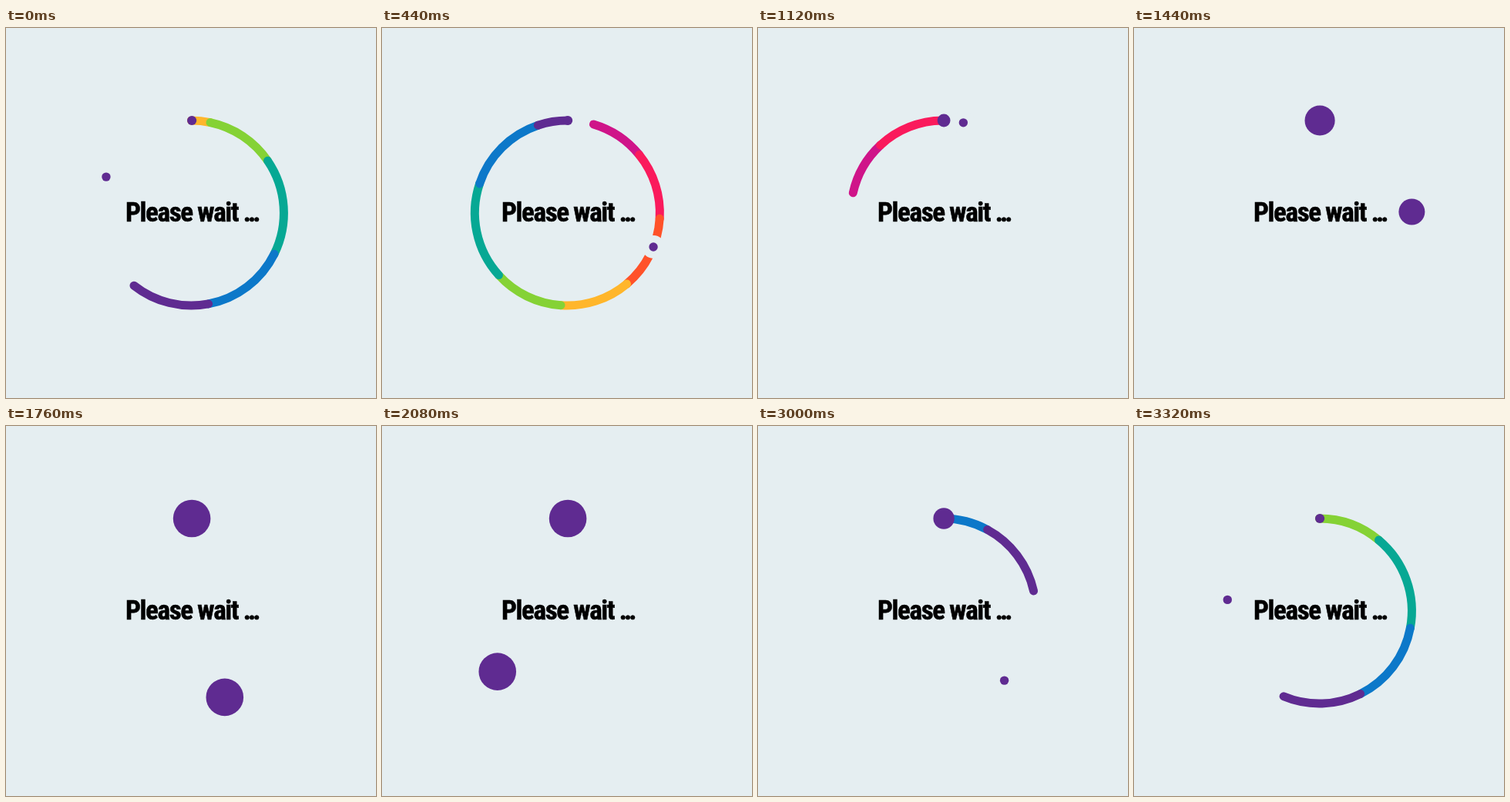
An HTML page with a canvas for the animation above (3360 ms loop, 480x480 px).

```html
<!DOCTYPE html>
<html lang="en">
<head>
<meta charset="utf-8">
<title>Please wait</title>
<style>
  html, body { margin: 0; width: 100%; height: 100%; overflow: hidden; background: #e5eef1; }
  canvas, svg { position: absolute; left: 0; top: 0; width: 480px; height: 480px; }
  text {
    font-family: Impact, "Roboto Condensed", "Open Sans Condensed", "Liberation Sans Narrow", "Liberation Sans", sans-serif;
    font-weight: 900;
    letter-spacing: -0.04em;
    fill: #000;
    stroke: #000;
    stroke-width: 0.5px;
  }
  .dots { letter-spacing: -0.115em; }
</style>
</head>
<body>
<canvas id="ring" width="480" height="480"></canvas>
<svg viewBox="0 0 480 480"><text id="label" x="155" y="250.5" font-size="100">Please wait <tspan class="dots">...</tspan></text></svg>
<script>
const BG = '#e5eef1', PURPLE = '#5f2b91';
const CX = 240.4, CY = 240, R = 120, WIDTH = 11;
const TOP_X = 241.1;
const STEP = 40, STEPS = 84, OFFSET = 14;
const SPEED = 360 / 23;

// Colour bands from the head back, each with its end in degrees behind the head
const BANDS = [
  [PURPLE, 49], ['#0c78c9', 102], ['#06a894', 162.7], ['#85d235', 206.5],
  ['#ffb62b', 250.5], ['#ff5229', 297], ['#fa1a5c', 339.5], ['#cf1489', 374]
];

// Orbiting dot: [step, total degrees]
const ORBIT = [
  [0, 0], [1, 24], [2, 56], [3, 89], [4, 116], [5, 138.7], [8, 193], [13, 277], [14, 293],
  [25, 471.5], [42, 732.5], [56, 860.7], [58, 878.8], [70, 983], [74, 1015], [84, 1080]
];

const ctx = document.getElementById('ring').getContext('2d');
const rad = deg => (deg - 90) * Math.PI / 180;

function ease(n, from, to) {
  const p = Math.min(1, Math.max(0, (n - from) / (to - from)));
  return p * p * (3 - 2 * p);
}

const slope = i => (ORBIT[i + 1][1] - ORBIT[i][1]) / (ORBIT[i + 1][0] - ORBIT[i][0]);

function tangent(i) {
  if (i === 0) return slope(0);
  if (i === ORBIT.length - 1) return 4;
  const a = slope(i - 1), b = slope(i);
  return 2 * a * b / (a + b);
}

function orbitAngle(n) {
  let i = 0;
  while (i < ORBIT.length - 2 && n >= ORBIT[i + 1][0]) i++;
  const [x0, y0] = ORBIT[i], [x1, y1] = ORBIT[i + 1];
  const h = x1 - x0, p = (n - x0) / h, q = 1 - p;
  return y0 * (1 + 2 * p) * q * q + h * tangent(i) * p * q * q
       + y1 * p * p * (3 - 2 * p) - h * tangent(i + 1) * p * p * q;
}

function disc(x, y, r, color) {
  ctx.fillStyle = color;
  ctx.beginPath();
  ctx.arc(x, y, r, 0, 2 * Math.PI);
  ctx.fill();
}

function drawBands(head) {
  ctx.lineWidth = WIDTH;
  ctx.lineCap = 'round';
  for (let i = BANDS.length - 1; i >= 0; i--) {
    const [color, end] = BANDS[i];
    const from = Math.max(0, head - end);
    const to = Math.min(360, head - (i ? BANDS[i - 1][1] : 0));
    if (to <= from) continue;
    ctx.strokeStyle = color;
    ctx.beginPath();
    ctx.arc(CX, CY, R, rad(from), rad(to));
    ctx.stroke();
  }
}

function draw(time) {
  const n = (Math.floor(time / STEP) + OFFSET) % STEPS;
  const a = rad(orbitAngle(n));
  const x = CX + R * Math.cos(a), y = CY + R * Math.sin(a);
  const orbitR = 5.7 + 18.6 * (1 - ease(n, 0, 5) + ease(n, 42, 56));
  const topR = 6.1 + 18.2 * (1 - ease(n, 0, 9) + ease(n, 38, 56));
  ctx.fillStyle = BG;
  ctx.fillRect(0, 0, 480, 480);
  drawBands(n * SPEED - 0.8);
  disc(x, y, Math.max(15, orbitR), BG);
  disc(x, y, orbitR, PURPLE);
  disc(TOP_X, CY - R, topR, PURPLE);
}

// Pick the type size that gives the line its length in the available font
const label = document.getElementById('label');
label.setAttribute('font-size', 100 * 171.5 / label.getComputedTextLength());

const start = performance.now();
function tick() {
  draw(performance.now() - start);
  requestAnimationFrame(tick);
}
tick();
</script>
</body>
</html>
```
